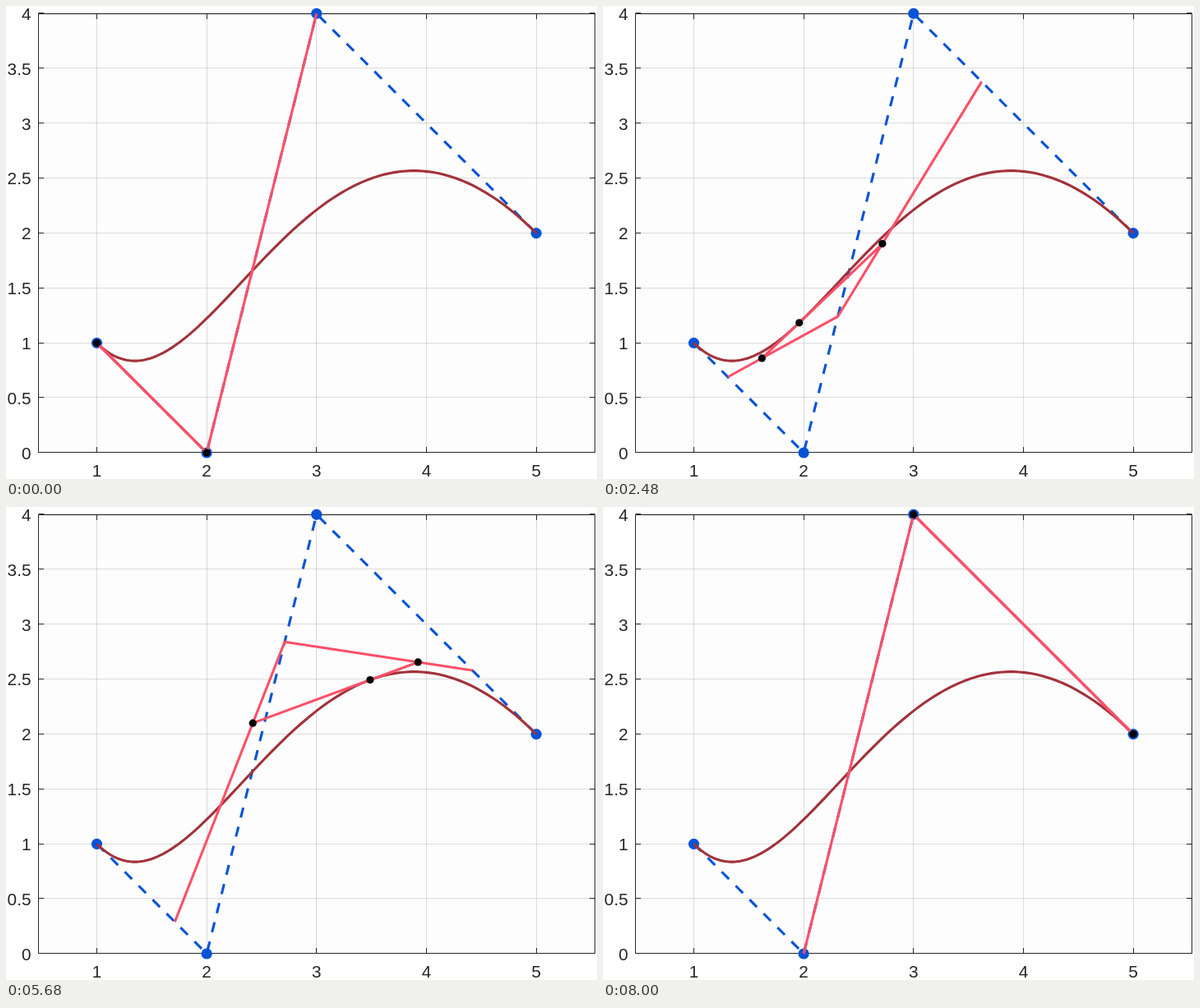
An HTML page with a canvas for the animation above (8.08 s loop, 719x576 px).

```html
<!DOCTYPE html>
<html lang="en">
<head>
<meta charset="utf-8">
<title>Cubic curve construction</title>
<style>
  html, body { margin: 0; width: 100%; height: 100%; overflow: hidden; background: #fff; }
  canvas { display: block; }
</style>
</head>
<body>
<canvas id="stage" width="719" height="576"></canvas>
<script>
const ctx = document.getElementById('stage').getContext('2d');
const STEP_MS = 80, STEPS = 100;
const BOX = { left: 39.5, top: 9.5, right: 716.5, bottom: 543.5 };
const CONTROL = [[1, 1], [2, 0], [3, 4], [5, 2]];
const BLUE = '#0553d6', RED = '#fb5068', CURVE = '#a2323a', INK = '#262626';

const px = x => 110.5 + (x - 1) * 133.65;
const py = y => 544 - y * 133.7;
const snap = v => Math.floor(v) + 0.5;

function stroke(points, color, width, dash = []) {
  ctx.beginPath();
  for (const [x, y] of points) ctx.lineTo(px(x), py(y));
  ctx.strokeStyle = color;
  ctx.lineWidth = width;
  ctx.lineJoin = 'round';
  ctx.setLineDash(dash);
  ctx.stroke();
  ctx.setLineDash([]);
}

function dots(points, color, radius) {
  ctx.fillStyle = color;
  for (const [x, y] of points) {
    ctx.beginPath();
    ctx.arc(px(x), py(y), radius, 0, 2 * Math.PI);
    ctx.fill();
  }
}

function line(x1, y1, x2, y2, color) {
  ctx.beginPath();
  ctx.moveTo(x1, y1);
  ctx.lineTo(x2, y2);
  ctx.strokeStyle = color;
  ctx.lineWidth = 1;
  ctx.stroke();
}

// One round of linear interpolation between neighbouring points.
const blend = (points, t) => points.slice(1).map((p, i) =>
  p.map((v, k) => points[i][k] + (v - points[i][k]) * t));

const bezier = t => blend(blend(blend(CONTROL, t), t), t)[0];
const curve = Array.from({ length: STEPS + 1 }, (_, i) => bezier(i / STEPS));

function drawAxes() {
  const { left, top, right, bottom } = BOX, tick = 6.5, grid = '#26262628';
  ctx.fillStyle = '#fff';
  ctx.fillRect(0, 0, 719, 576);
  ctx.fillStyle = '#fdfdfd';
  ctx.fillRect(left, top, right - left, bottom - top);
  ctx.font = '20.8px "Liberation Sans", Arial, sans-serif';
  ctx.textBaseline = 'alphabetic';

  ctx.textAlign = 'center';
  for (let v = 1; v <= 5; v++) {
    const x = snap(px(v));
    line(x, top, x, bottom, grid);
    line(x, top, x, top + tick, INK);
    line(x, bottom, x, bottom - tick, INK);
    ctx.fillStyle = INK;
    ctx.fillText(v, px(v), 573);
  }
  ctx.textAlign = 'right';
  for (let v = 0; v <= 4; v += 0.5) {
    const y = snap(py(v) - 0.3);
    line(left, y, right, y, grid);
    line(left, y, left + tick, y, INK);
    line(right, y, right - tick, y, INK);
    ctx.fillStyle = INK;
    ctx.fillText(v, 30.5, py(v) + 7.7);
  }
  ctx.strokeStyle = INK;
  ctx.lineWidth = 1;
  ctx.strokeRect(left, top, right - left, bottom - top);
}

function draw(now) {
  const t = Math.floor(now / STEP_MS) % (STEPS + 1) / STEPS;
  const first = blend(CONTROL, t);
  const second = blend(first, t);
  const point = blend(second, t);

  drawAxes();
  stroke(CONTROL, BLUE, 3.1, [12.5, 11.5]);
  dots(CONTROL, BLUE, 6.6);
  stroke(curve, CURVE, 3.1);
  stroke(first, RED, 3.1);
  stroke(second, RED, 3.1);
  dots([...second, ...point], '#000', 4.6);
  requestAnimationFrame(draw);
}
requestAnimationFrame(draw);
</script>
</body>
</html>
```
